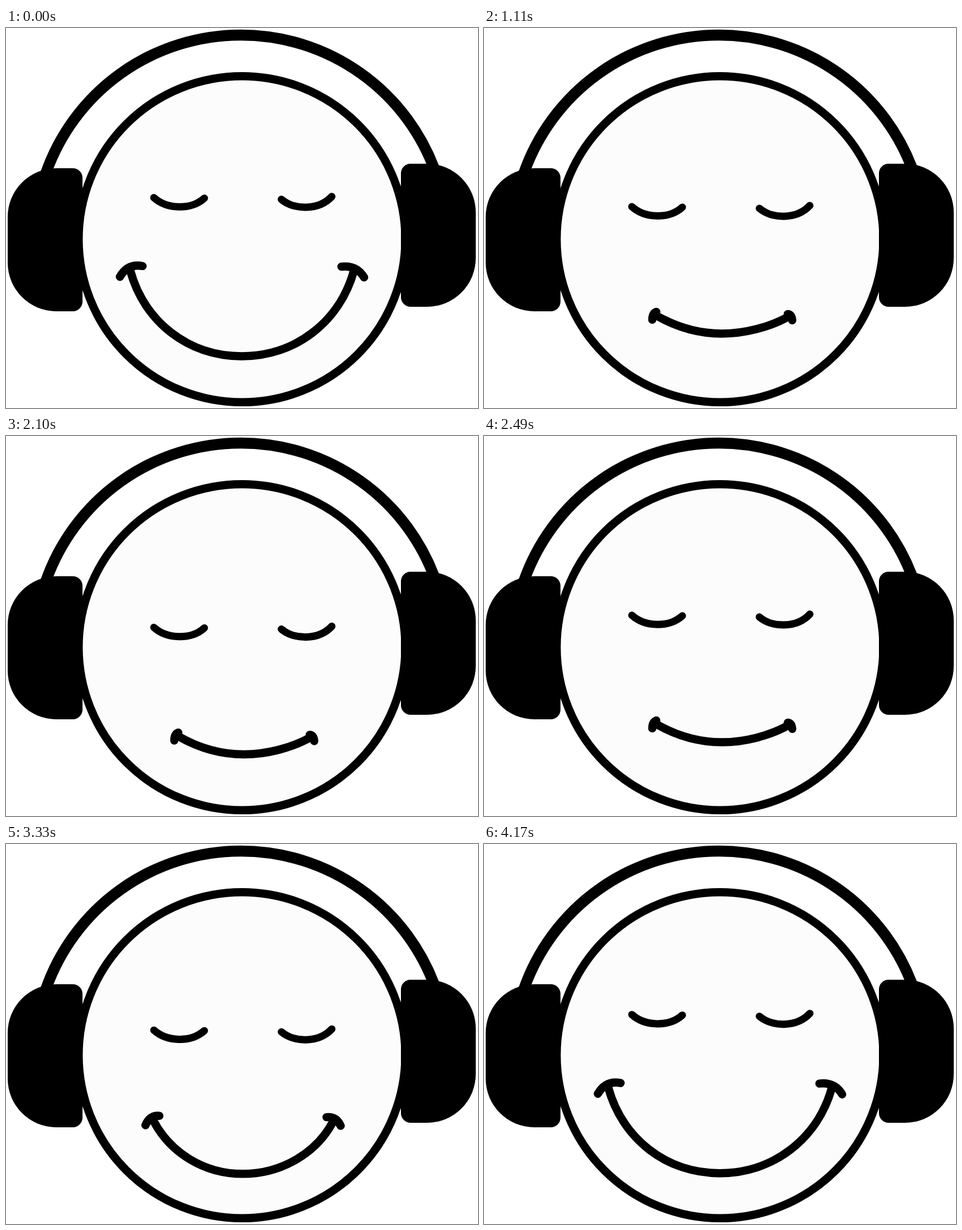
These frames come from a looping animation (833 px wide and 672 px high, 4.2 s). An HTML page:

```html
<!DOCTYPE html>
<html lang="en">
<head>
<meta charset="utf-8">
<title>Headphones</title>
<style>
  html, body { margin: 0; width: 100%; height: 100%; overflow: hidden; background: #fff; }
  svg { display: block; width: 100vw; height: 100vh; }
  .line { fill: none; stroke: #000; stroke-linecap: round; }
</style>
</head>
<body>
<svg viewBox="0 0 833 672">
  <defs>
    <path id="pad" d="M118 248a17 17 0 0 1 17 17V484a17 17 0 0 1-17 17H89A86 86 0 0 1 3 415V334A86 86 0 0 1 89 248Z"/>
  </defs>
  <path d="M69.6 259A364.5 364.5 0 0 1 759.4 259" fill="none" stroke="#000" stroke-width="19.5"/>
  <circle cx="416.5" cy="373.5" r="288.3" fill="#fcfcfc" stroke="#000" stroke-width="14.5"/>
  <use href="#pad"/>
  <use href="#pad" transform="translate(832 -8) scale(-1 1)"/>
  <g id="face" class="line">
    <path stroke-width="13" d="M261 300C284 321 327 322 350 301M486 303C508 322 552 323 575 298"/>
    <path id="mouth" stroke-width="14.5"/>
  </g>
</svg>
<script>
const LOOP = 4200, STEP = 30, BOB = 1400, DEPTH = 38.5;
const face = document.getElementById('face');
const mouth = document.getElementById('mouth');

// Lips, left cheek, right cheek
const calm = 'M305 493C340 513 380 524.5 420 524.5S505 513 538 494M297 500Q297 489 304 486M536 490Q543 490 544 501';
const grin = 'M219 428C244 520 322 580.5 416 580.5S589 520 614 429M201 440Q215 416 241 421M592 422Q619 419 632 441';
const grinNumbers = grin.match(/[\d.]+/g).map(Number);

const clamp = v => Math.min(1, Math.max(0, v));

function morph(amount) {
  let i = 0;
  return calm.replace(/[\d.]+/g, n => (+n + (grinNumbers[i++] - n) * amount).toFixed(2));
}

function smileAt(t) {
  return t < 2000 ? 1 - clamp(t / 500) : clamp((t - 2800) / 1000);
}

function draw(time) {
  const t = Math.floor((time % LOOP) / STEP) * STEP;
  const phase = (t % BOB) / BOB;
  const drop = DEPTH * (1 - Math.abs(1 - 2 * phase));
  face.setAttribute('transform', `translate(0 ${drop.toFixed(2)})`);
  mouth.setAttribute('d', morph(smileAt(t)));
}

const start = performance.now();
function tick() {
  draw(performance.now() - start);
  requestAnimationFrame(tick);
}
tick();
</script>
</body>
</html>
```
